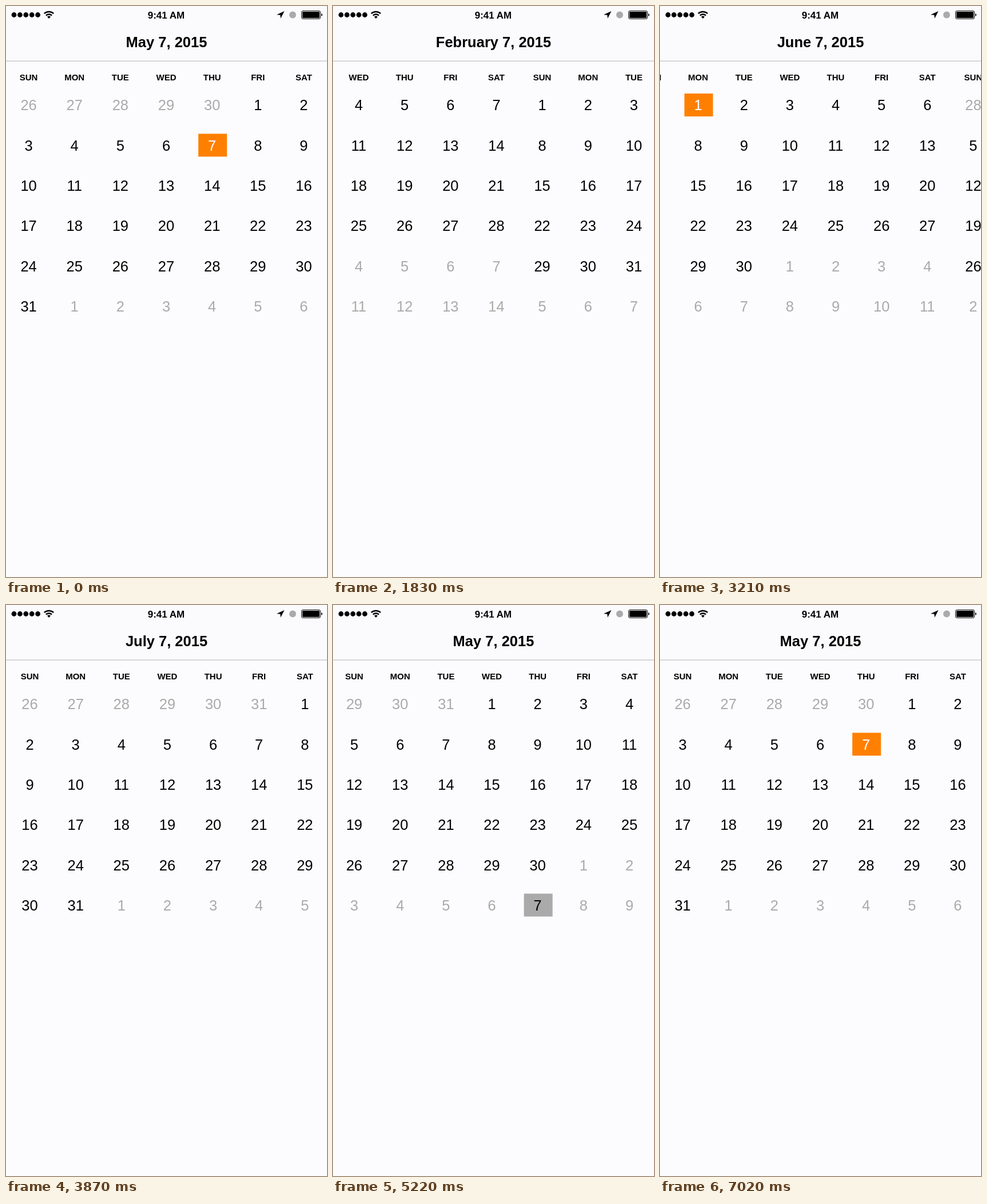
An HTML page that plays this animation: 561 by 998 pixels, repeating every 7050 ms.

```html
<!DOCTYPE html>
<html lang="en">
<head>
<meta charset="utf-8">
<title>Month calendar</title>
<style>
  html, body { margin: 0; width: 100%; height: 100%; overflow: hidden; background: #fcfcfe; }
  svg { display: block; width: 100%; height: 100%; }
  text { font-family: "Liberation Sans", Arial, sans-serif; text-anchor: middle; fill: #000; }
  .title { font-size: 25.5px; font-weight: 700; }
  .clock { font-size: 17px; font-weight: 700; }
  .weekday { font-size: 15px; font-weight: 700; }
  .day { font-size: 25.5px; }
  .out { fill: #aaa; }
  .box { fill: none; }
  .today .box { fill: #aaa; }
  .today .day { fill: #000; }
  .selected .box { fill: #ff8000; }
  .selected .day { fill: #fff; }
</style>
</head>
<body>
<svg viewBox="0 0 561 998">
  <rect width="561" height="998" fill="#fcfcfe"/>
  <g id="track"></g>
  <rect width="561" height="96" fill="#fbfbfd"/>
  <rect y="95.5" width="561" height="1.5" fill="#cbcbd0"/>
  <g id="signal"></g>
  <g fill="none" stroke="#000" stroke-width="2.4">
    <path d="M66.8 13.2a12 12 0 0 1 16.4 0"/>
    <path d="M69.9 16.6a7.4 7.4 0 0 1 10.2 0"/>
  </g>
  <path d="M75 22l-3-3.2a4.4 4.4 0 0 1 6 0z"/>
  <text class="clock" x="280" y="21.5">9:41 AM</text>
  <path d="M486.500 9L473 15.300l6.300 .4 .7 6z"/>
  <circle cx="501" cy="15.500" r="6" fill="#aaa"/>
  <rect x="516.500" y="8.500" width="33" height="14" rx="2.500" fill="none" stroke="#000"/>
  <rect x="518" y="10" width="30" height="11" rx="1"/>
  <path d="M551 13a2.600 2.600 0 0 1 0 5z"/>
  <text class="title" id="oldTitle" y="9"></text>
  <text class="title" id="newTitle" y="9"></text>
</svg>
<script>
const LOOP = 7050, STEP = 30, WIDTH = 561, TITLE_TIME = 135;
const FIRST_MONTH = 2, LAST_MONTH = 8, HOME = { month: 5, day: 7 };
const MONTHS = ["January", "February", "March", "April", "May", "June", "July", "August"];
const WEEKDAYS = ["SUN", "MON", "TUE", "WED", "THU", "FRI", "SAT"];

// Swipes: start ms, settle ms, month reached, day in the title
const SWIPES = [
  [600, 950, 4, 1], [950, 1304, 3, 7], [1304, 1690, 2, 7],
  [1690, 2070, 3, 7], [2070, 2453, 4, 7], [2453, 2760, 5, 7],
  [2760, 3070, 6, 7], [3156, 3556, 7, 7], [3556, 3890, 8, 7],
  [3890, 4228, 7, 7], [4228, 4598, 6, 7], [4598, 4900, 5, 7],
  [4910, 5242, 4, 7], [5835, 6312, 5, 7]
];

const byId = id => document.getElementById(id);

function add(parent, tag, attrs, content = "") {
  const node = document.createElementNS("http://www.w3.org/2000/svg", tag);
  for (const key in attrs) node.setAttribute(key, attrs[key]);
  node.textContent = content;
  return parent.appendChild(node);
}

const columnX = column => WIDTH / 7 * (column + 0.5) - 0.5;
const pageX = month => (month - FIRST_MONTH) * WIDTH;
const titleOf = (month, day) => `${MONTHS[month - 1]} ${day}, 2015`;
const selectable = {};

function buildMonth(month) {
  const page = add(byId("track"), "g", { transform: `translate(${pageX(month)} 0)` });
  WEEKDAYS.forEach((name, i) => add(page, "text", { class: "weekday", x: columnX(i), y: 129.5 }, name));
  const lead = new Date(2015, month - 1, 1).getDay();
  for (let i = 0; i < 42; i++) {
    const date = new Date(2015, month - 1, 1 - lead + i);
    const inside = date.getMonth() === month - 1, day = date.getDate();
    const isToday = date.getMonth() === HOME.month - 1 && day === HOME.day;
    const y = 173 + 70.3 * Math.floor(i / 7);
    const cell = add(page, "g", {
      class: isToday ? "today" : "",
      transform: `translate(${columnX(i % 7)} ${y})`
    });
    add(cell, "rect", { class: "box", x: -24, y: -20, width: 50, height: 40 });
    add(cell, "text", { class: inside ? "day" : "day out", y: 9.3 }, day);
    if (inside && day === (month === HOME.month ? HOME.day : 1)) selectable[month] = cell;
  }
}

for (let m = FIRST_MONTH; m <= LAST_MONTH; m++) buildMonth(m);
for (let i = 0; i < 5; i++) add(byId("signal"), "circle", { cx: 14 + 10.4 * i, cy: 15.5, r: 4.4 });

const swipeEase = u => 1 - Math.pow(1 - Math.pow(u, 1.6), 2.4);

function showTitle(node, content, amount) {
  node.textContent = content;
  node.setAttribute("opacity", amount);
  node.setAttribute("transform", `translate(280.5 63) scale(1 ${0.1 + 0.9 * amount})`);
}

function draw(t) {
  let month = HOME.month, x = pageX(month), settledAt = -LOOP;
  let title = titleOf(month, HOME.day), previous = title;
  for (const [start, end, next, day] of SWIPES) {
    if (t < start) break;
    if (t < end) {
      x += (pageX(next) - x) * swipeEase((t - start) / (end - start));
      break;
    }
    previous = title;
    title = titleOf(next, day);
    month = next;
    x = pageX(next);
    settledAt = end;
  }
  byId("track").setAttribute("transform", `translate(${-x} 0)`);
  for (const m in selectable) selectable[m].classList.toggle("selected", +m === month);

  const u = Math.min(1, (t - settledAt) / TITLE_TIME);
  const shown = u * u * (0.6 + 0.4 * u);
  showTitle(byId("oldTitle"), previous, 1 - shown);
  showTitle(byId("newTitle"), title, shown);
}

const began = performance.now();
function tick() {
  const t = (performance.now() - began) % LOOP;
  draw(Math.floor(t / STEP) * STEP);
  requestAnimationFrame(tick);
}
tick();
</script>
</body>
</html>
```
